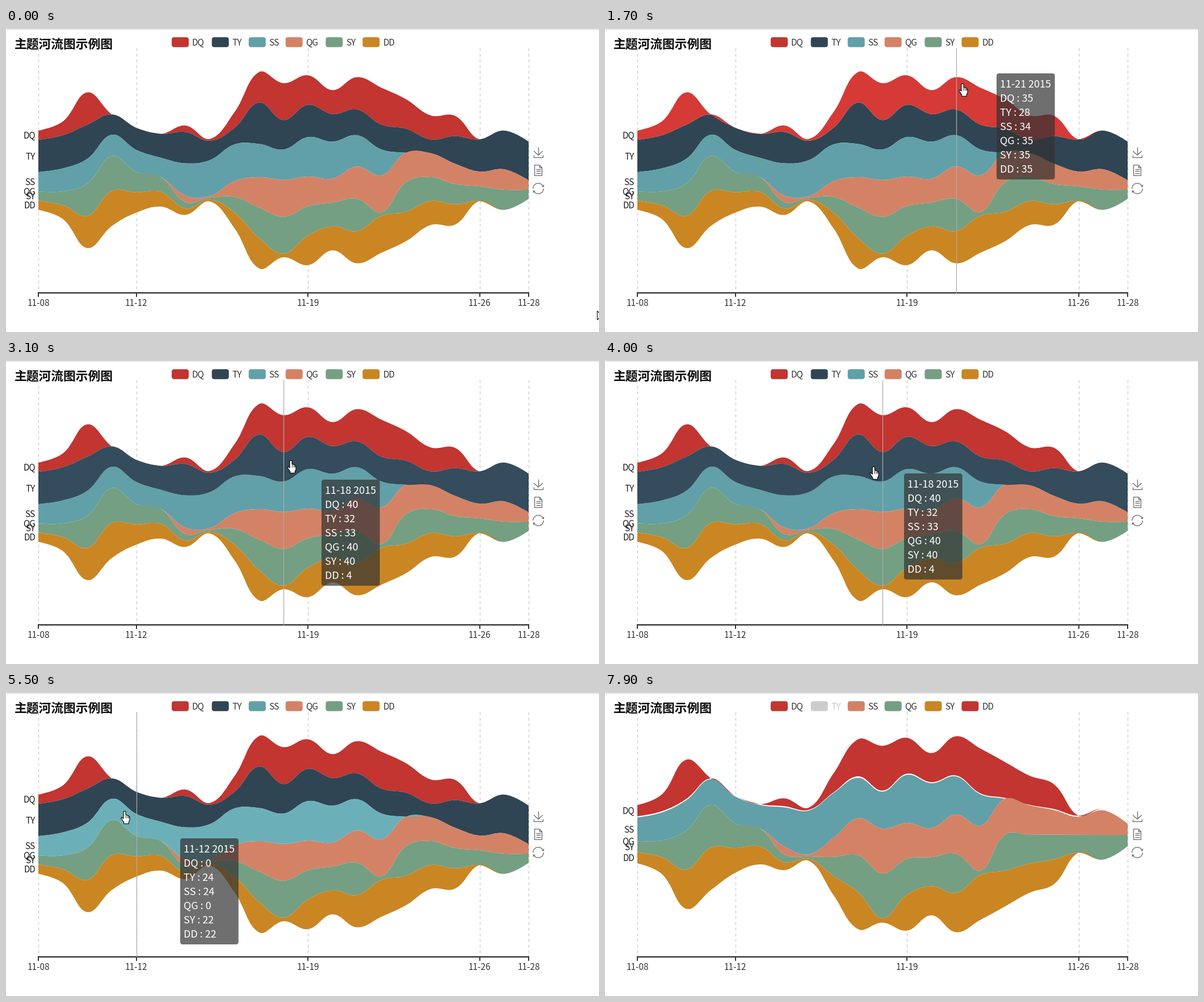
A matplotlib script for the animation above (8000 ms loop, 1045x536 px).

```python
import numpy as np
import matplotlib.pyplot as plt
from matplotlib.animation import FuncAnimation
from matplotlib.patches import FancyBboxPatch, PathPatch, Polygon
from matplotlib.path import Path

W, H, DPI = 1045, 536, 100
STEP, FRAMES = 100, 80
PT = 72 / DPI                      # points per pixel
LEFT, RIGHT, TOP, BOTTOM = 57, 921, 34.5, 467
FONT = "Noto Sans CJK JP"

NAMES = ["DQ", "TY", "SS", "QG", "SY", "DD"]
COLORS = ["#c23531", "#2f4554", "#61a0a8", "#d48265", "#749f83", "#ca8622"]
OFF_COLORS = [COLORS[0], "#cccccc", *COLORS[3:], COLORS[0]]
advance = [70.7 if "Q" in name else 65 for name in NAMES]
LEGEND_X = 292 + np.cumsum([0] + advance[:-1])

# Daily values, 11-08 to 11-28; four layers share one base series
DAYS = 21
days = np.arange(DAYS)
xs = np.linspace(LEFT, RIGHT, DAYS)
base = np.array([10, 15, 35, 38, 22, 16, 7, 2, 17, 33, 40,
                 32, 26, 35, 40, 32, 26, 22, 16, 22, 10])
ty = [35, 36, 37, 22, 24, 26, 34, 21, 18, 45, 32,
      35, 30, 28, 27, 26, 15, 30, 35, 42, 42]
ss = [21, 25, 27, 23, 24, 21, 35, 39, 40, 36, 33, 43, 40, 34, 28] + [0] * 6
dq = base * ((days < 3) | (days > 5)) * (days < 18)
qg = base * (days > 5)
sy = np.where(days == 14, 4, base)
dd = np.where(days == 10, 4, base) * (days < 18)
values = np.array([dq, ty, ss, qg, sy, dd])

TOGGLE, MORPH = 7700, 300
TIP_ON, TIP_OFF, CURSOR_OFF = 1500, 6700, 6600
TIP_W, TIP_H, TIP_GAP, TIP_LAG = 102.7, 187, (25, 23), 100

# Cursor moves: start, end, a point passed just before the end, resting point
ENTRY = (1042, 499)
MOVES = [(0, 900, (975, 130), (966, 85)),
         (900, 1250, (860, 8), (820, 2)),
         (1250, 1700, (665, 57), (630, 98)),
         (1700, 2000, (628, 135), (627, 148)),
         (2600, 3100, (531, 188), (502, 177)),
         (3900, 4500, (358, 232), (351, 207)),
         (5100, 5500, (282, 235), (209, 210)),
         (6100, 6600, (302, 65), (333, 3))]


def cursor_at(t):
    pos = np.array(ENTRY, float)
    for start, end, via, rest in MOVES:
        if t < start:
            break
        stops = np.array([pos, via, rest])
        pos = np.array([np.interp(t, (start, end - 100, end), axis)
                        for axis in stops.T])
    return pos


def layer_edges(vals):
    """Boundaries of the stacked layers, centred on the plot."""
    total = vals.sum(axis=0)
    scale = 0.8 * (BOTTOM - TOP) / total.max()
    heights = np.vstack([np.zeros(DAYS), np.cumsum(vals, axis=0)])
    return (TOP + BOTTOM) / 2 + scale * (heights - total / 2)


def smooth_curve(pts, smooth=0.4):
    """Bezier vertices through pts, with handles along the neighbours' chord."""
    seg = np.hypot(*np.diff(pts, axis=0).T)
    ratio = (seg[1:] / (seg[1:] + seg[:-1]))[:, None]
    chord = (pts[2:] - pts[:-2]) * smooth
    into, out = pts.copy(), pts.copy()
    into[1:-1] -= chord * (1 - ratio)
    out[1:-1] += chord * ratio
    body = np.stack([out[:-1], into[1:], pts[1:]], axis=1).reshape(-1, 2)
    return np.vstack([pts[:1], body])


def band_path(upper, lower):
    a = smooth_curve(np.column_stack([xs, upper]))
    b = smooth_curve(np.column_stack([xs, lower]))[::-1]
    run = [Path.CURVE4] * (len(a) - 1)
    return Path(np.vstack([a, b]), [Path.MOVETO] + run + [Path.LINETO] + run)


def lift(color):
    rgb = [int(color[k:k + 2], 16) / 255 for k in (1, 3, 5)]
    return tuple(min(1, c * 1.1) for c in rgb)


full = layer_edges(values)
reduced = layer_edges(values * (np.arange(6) != 1)[:, None])
full_paths = [band_path(a, b) for a, b in zip(full, full[1:])]

fig = plt.figure(figsize=(W / DPI, H / DPI), dpi=DPI, facecolor="white")
ax = fig.add_axes([0, 0, 1, 1])
ax.set_xlim(0, W)
ax.set_ylim(H, 0)
ax.axis("off")


def line(x, y, color, width=1, z=1, **kw):
    kw.setdefault("solid_capstyle", "butt")
    return ax.plot(x, y, color=color, lw=width * PT, zorder=z, **kw)[0]


def text(x, y, s, size, color="#333333", z=5, **kw):
    return ax.text(x, y, s, fontsize=size * PT, color=color, zorder=z,
                   family=FONT, va="baseline", **kw)


def rounded(x, y, w, h, color, z, **kw):
    patch = FancyBboxPatch((x, y), w, h, lw=0, fc=color, zorder=z,
                           boxstyle="round,pad=0,rounding_size=4.4", **kw)
    return ax.add_patch(patch)


def icon(strokes, cy, cx=938):
    """Strokes on a 60 unit grid, fitted to the toolbox size."""
    pts = np.vstack(strokes)
    low, high = pts.min(axis=0), pts.max(axis=0)
    scale = 18.5 / (high - low).max()
    for s in strokes:
        p = (np.array(s) - (low + high) / 2) * scale + (cx, cy)
        line(p[:, 0], p[:, 1], "#666666", 1.25, 4)


def arc(start, end):
    a = np.radians(np.linspace(start, end, 40))
    return np.column_stack([30 + 28 * np.cos(a), 30 + 28 * np.sin(a)])


# Static parts
line([0, W], [0.5, 0.5], "#a6a6a6")
text(14.5, 36.3, "主题河流图示例图", 21.8, "#0c0c0c", weight="bold")

line([LEFT - 1, RIGHT + 1], [466.5, 466.5], "#333333", 2.4, 4)
for day in (0, 4, 11, 18, 20):
    x = xs[day]
    line([x, x], [TOP, BOTTOM], "#c8c8c8", 1.25, 1, dashes=(4, 4))
    line([x, x], [BOTTOM, 473.5], "#333333", 2, 4)
    text(x, 490.3, f"11-{8 + day:02d}", 15.4, ha="center")

download = [[(5, 23), (29, 45), (54, 23)], [(29, 45), (29, 0)],
            [(5, 44), (5, 58), (54, 58), (54, 44)]]
sheet = [[(38, 2), (38, 15), (51, 15)],
         [(12, 2), (12, 58), (51, 58), (51, 15), (38, 2), (12, 2)]]
sheet += [[(18, y), (45, y)] for y in (24, 34, 44)]
restore = [arc(-21, -181), [(47, 19), (57, 19), (57, 9)],
           arc(159, -1), [(13, 41), (3, 41), (3, 51)]]
for k, strokes in enumerate((download, sheet, restore)):
    icon(strokes, 219 + 32 * k)

# Moving parts
bands, labels, swatches, legend = [], [], [], []
for x, name, color, path in zip(LEGEND_X, NAMES, COLORS, full_paths):
    bands.append(ax.add_patch(PathPatch(path, lw=0)))
    labels.append(text(52, 0, name, 15.2, "#1a1a1a", ha="right"))
    swatches.append(rounded(x, 16.25, 30, 17.5, color, 4))
    legend.append(text(x + 35.7, 30.7, name, 15.4))

pointer = line([0, 0], [TOP, BOTTOM], "#aaaaaa", 1.25, 6)
tip_box = rounded(0, 0, TIP_W, TIP_H, (50 / 255,) * 3, 7, alpha=0.7)
tip_rows = [text(0, 0, "", 18, "white", 8, weight="medium") for _ in range(7)]

ARROW = np.array([(0, 0), (0, 15.5), (3.6, 12.2), (6, 17.3), (8.2, 16.3),
                  (5.9, 11.3), (10.8, 11)])
HAND = np.array([(-2, 1), (0, 0), (2, 1), (2, 6.5), (6.5, 7.8), (9, 10.5),
                 (9, 16), (7.2, 19.5), (7.2, 22.3), (-1.3, 22.3),
                 (-1.5, 19.5), (-6.3, 12.5), (-5, 11), (-2, 13.2)])
cursor = ax.add_patch(Polygon(ARROW, fc="white", ec="black", lw=1.1 * PT,
                              joinstyle="round", zorder=10))
knuckles = [line([0, 0], [0, 1], "black", 0.9, 11) for _ in range(3)]


def hovered_layer(pos):
    for k, path in enumerate(full_paths):
        if path.contains_point(pos):
            return k
    return None


def draw_river(t, hover):
    off = t >= TOGGLE
    left = (1 - np.clip((t - TOGGLE) / MORPH, 0, 1)) ** 3
    edges = reduced + (full - reduced) * left
    for k, band in enumerate(bands):
        shown = not (off and k == 1)
        band.set_visible(shown)
        band.set_path(band_path(edges[k], edges[k + 1]))
        band.set_facecolor(lift(COLORS[k]) if k == hover else COLORS[k])
        band.set_zorder(3 if k == hover else 2)
        labels[k].set_visible(shown)
        labels[k].set_y((edges[k, 0] + edges[k + 1, 0]) / 2 + 6)
        swatches[k].set_facecolor((OFF_COLORS if off else COLORS)[k])
    legend[1].set_color("#cccccc" if off else "#333333")


def draw_tip(t, day):
    shown = TIP_ON <= t <= TIP_OFF
    x, y = cursor_at(t - TIP_LAG) + TIP_GAP
    tip_box.set_visible(shown)
    tip_box.set_bounds(x, y, TIP_W, TIP_H)
    lines = [f"11-{8 + day:02d} 2015"]
    lines += [f"{n} : {v}" for n, v in zip(NAMES, values[:, day])]
    for k, (row, s) in enumerate(zip(tip_rows, lines)):
        row.set_visible(shown)
        row.set_text(s)
        row.set_position((x + 6, y + 24.7 + 25 * k))


def draw_cursor(x, y, hand, shown):
    cursor.set_visible(shown)
    cursor.set_xy((HAND if hand else ARROW) + (x, y))
    for k, mark in enumerate(knuckles):
        mark.set_visible(shown and hand)
        kx = x + 2 + 2.5 * k
        mark.set_data([kx, kx], [y + 6.5 + k, y + 11.5])


def draw(i):
    t = i * STEP
    x, y = cursor_at(t)
    present = t <= CURSOR_OFF
    hover = hovered_layer((x, y)) if present else None
    day = int(np.clip(round((x - LEFT) / (xs[1] - xs[0])), 0, DAYS - 1))
    on_legend = present and LEGEND_X[0] < x < 690 and y < TOP

    draw_river(t, hover)
    if on_legend and x < LEGEND_X[1]:
        swatches[0].set_facecolor(lift(COLORS[0]))
    draw_tip(t, day)
    pointer.set_visible(present and LEFT <= x <= RIGHT and TOP <= y <= BOTTOM)
    pointer.set_xdata([xs[day]] * 2)
    draw_cursor(x, y, hover is not None or on_legend, present)
    return []


anim = FuncAnimation(fig, draw, frames=FRAMES, interval=STEP, repeat=True,
                     repeat_delay=0, blit=False)
plt.show()
```
